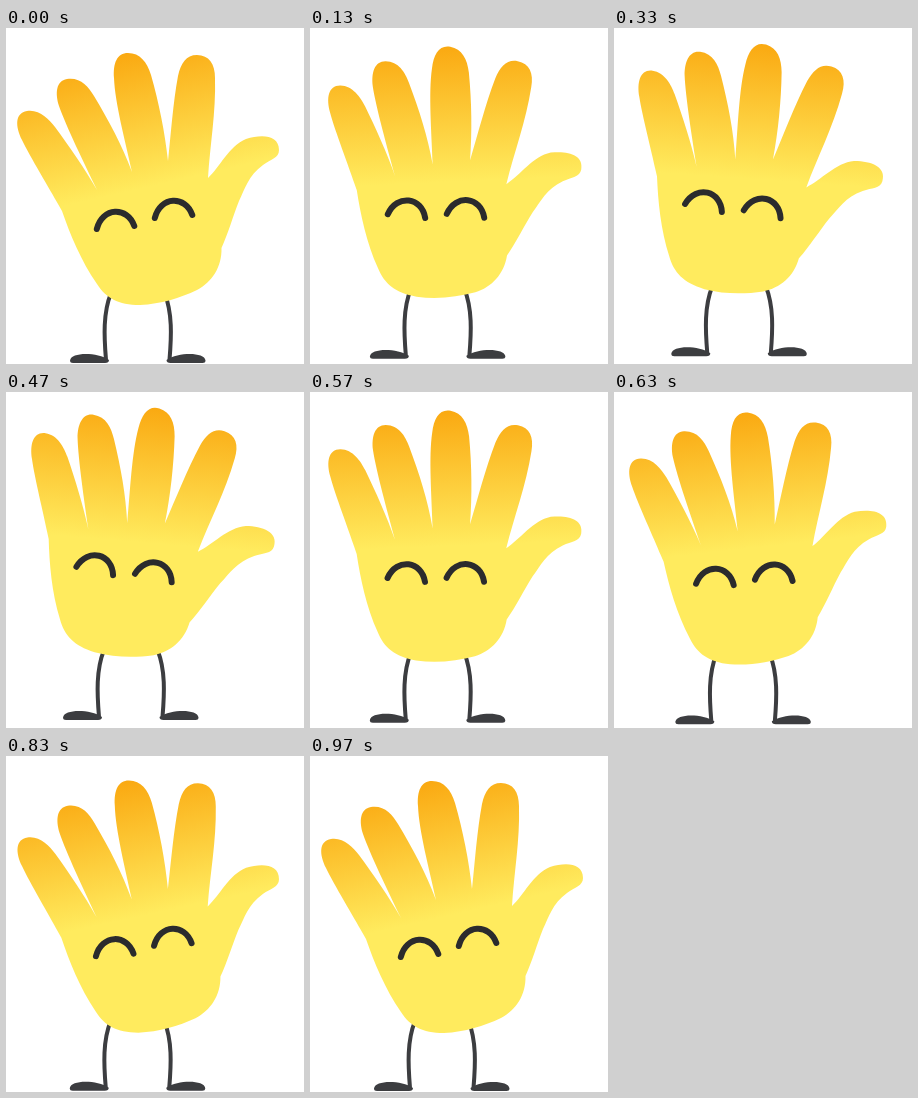
Recreate the animation shown at these times as an HTML page. Size 298 px wide and 336 px high, loop 1010 ms.

```html
<!DOCTYPE html>
<html lang="en">
<head>
<meta charset="utf-8">
<title>Waving hand</title>
<style>
  html, body { margin: 0; width: 100%; height: 100%; overflow: hidden; background: #fff; }
  svg { display: block; width: 298px; height: 336px; }
</style>
</head>
<body>
<svg viewBox="0 0 298 336">
  <defs>
    <linearGradient id="skin" gradientUnits="userSpaceOnUse" x1="115" y1="22" x2="146" y2="158">
      <stop offset="0" stop-color="#faa70f"/>
      <stop offset="1" stop-color="#ffeb5e"/>
    </linearGradient>
    <g id="leg">
      <path d="M106 265C98 285 99 308 101 332" fill="none" stroke="#3c3d40" stroke-width="4"/>
      <path d="M65 332.5C66 324 92 324 104 332Q104 335 100 335H68Q65 335 65 332.5Z" fill="#3c3d40"/>
    </g>
    <path id="eye" d="M90.8 201C96.3 179 121.3 178 128.3 198" fill="none"
      stroke="#2b2b2d" stroke-width="6" stroke-linecap="round"/>
  </defs>
  <g id="legs">
    <use href="#leg"/>
    <use href="#leg" transform="translate(265.5) scale(-1 1)"/>
  </g>
  <g id="hand">
    <path fill="url(#skin)" d="M52 176
      C45 163 23 127 16 112 C9 98 9 85 21 83 C33 81 43 91 49 99 C63 118 79 141 91 162
      C78 135 60 98 53 78 C49 65 50 53 61 51 C74 49 82 58 88 68 C103 93 116 117 126 144
      C119 112 109 75 108 50 C107 35 111 25 122 25 C134 25 141 34 145 47 C153 75 159 105 162 133
      C165 105 167 75 172 48 C175 35 180 27 191 27 C203 27 209 36 209 50 C210 85 204 117 202 150
      C214 139 223 118 240 111 C256 106 273 107 273 122 C273 130 265 131 257 137
      C242 148 239 161 233 173 C227 188 222 206 215.5 220
      C216 239 206 254 191 262 C174 270 155 276 134 277
      C112 277 100 270 91 256 C75 233 64 206 56 183 Z"/>
    <use href="#eye"/>
    <use href="#eye" x="58" y="-11"/>
  </g>
</svg>
<script>
  const LOOP = 1010, SWING = 505, BACK = 491;
  const hand = document.getElementById('hand');
  const legs = document.getElementById('legs');

  const easeOut = t => 1 - (1 - Math.min(t / SWING, 1)) ** 3;

  function draw(now) {
    const t = now % LOOP;
    const p = t < BACK ? easeOut(t) : 1 - easeOut(t - BACK);
    hand.setAttribute('transform', `rotate(${17.6 * p} 165.5 122)`);
    legs.setAttribute('transform', `translate(${-1 - 7 * p} ${-7 * p})`);
  }

  let start;
  function tick(now) {
    start ??= now;
    draw(now - start);
    requestAnimationFrame(tick);
  }
  draw(0);
  requestAnimationFrame(tick);
</script>
</body>
</html>
```
